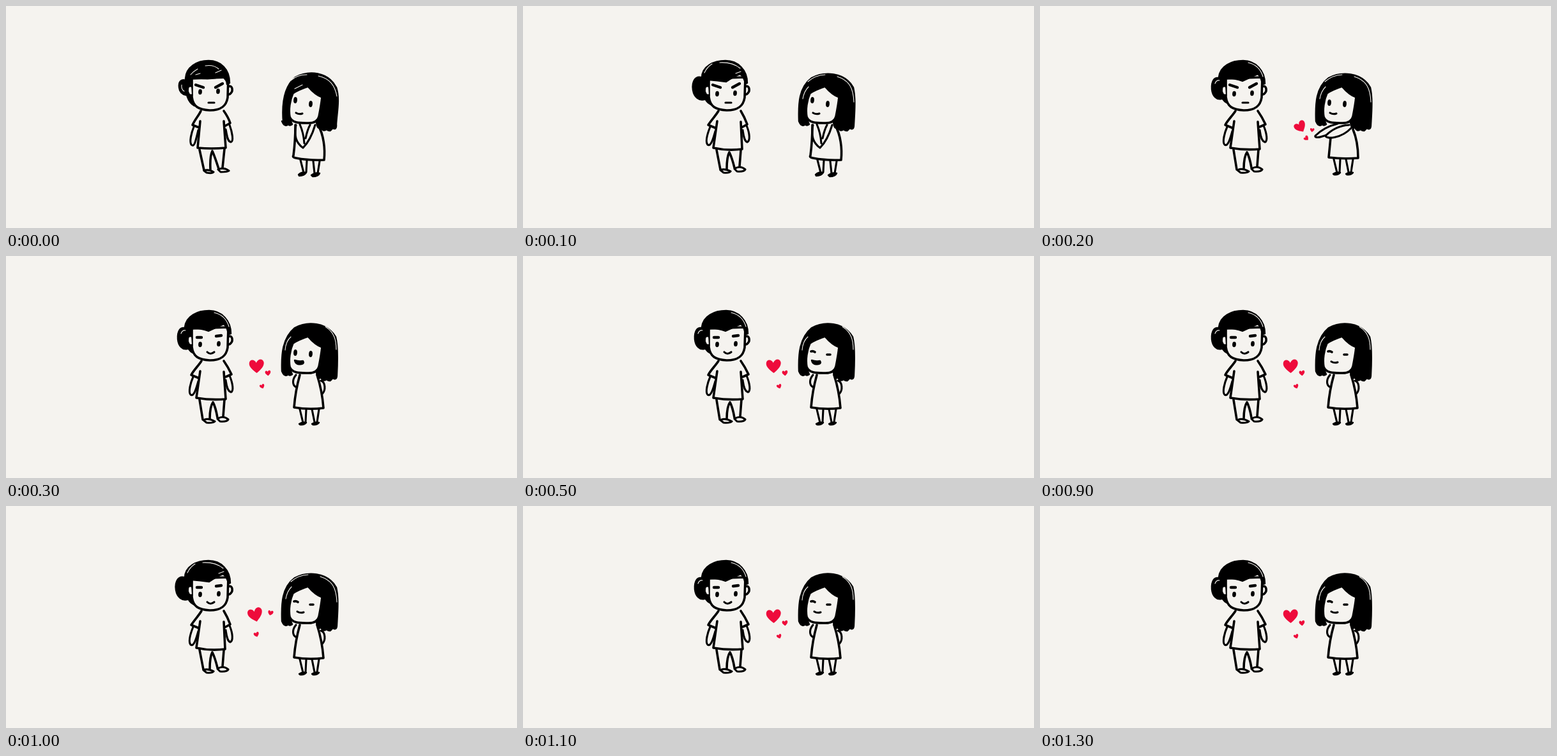
An HTML page for the animation above (1400 ms loop, 800 by 349 pixels).

```html
<!DOCTYPE html>
<html lang="en">
<head>
<meta charset="utf-8">
<title>Sending love</title>
<style>
  html, body { margin: 0; width: 100%; height: 100%; overflow: hidden; background: #f5f3ef; }
  svg { display: block; width: 100%; height: 100%; }
  path { fill: none; stroke: #000; stroke-width: 3.6; stroke-linecap: round; stroke-linejoin: round; }
  .skin { fill: #f5f3ef; }
  .ink { fill: #000; stroke-width: 2.4; }
  .brow { stroke-width: 4.4; }
  .fine { stroke-width: 3.1; }
  .shine { stroke: #f5f3ef; stroke-width: 1.1; }
  .love { fill: #ee0b3b; stroke: none; }
</style>
</head>
<body>
<svg id="stage" viewBox="0 0 800 349"></svg>
<script>
const path = (cls, d) => `<path class="${cls}" d="${d}"/>`;
const eye = (x, y, ry = 4.3) =>
  `<ellipse cx="${x}" cy="${y}" rx="2.9" ry="${ry}" transform="rotate(4 ${x} ${y})"/>`;
const heart = (x, y, size, turn) => `<g transform="translate(${x} ${y}) rotate(${turn}) scale(${size})">` +
  path('love', 'M0 11C-5 7 -12 1 -11 -5C-10 -12 -2 -11 0 -5C3 -12 11 -12 12 -5C12 2 5 7 0 11Z') + '</g>';

// Each redrawing of the man: bun, hair, shine, shirt, arms, legs, feet
const manInk = {
  A: {
    bun: 'M281 117C274 114 270 120 271 128C272 137 277 139 282 140Z',
    hair: 'M281 114C282 96 299 86 317 86C336 86 350 99 350 121L346 123C346 118 344 115 338 110C326 116 306 115 289 111L288 128C288 140 290 148 295 157C284 151 280 136 281 114Z',
    shine: 'M289 108Q293 103 300 99M297 108L304 106M312 94Q325 92 333 99M328 105L337 101M275 124Q274 131 279 134',
    shirt: 'M305 165C302 172 296 178 292 187L302 191M304 181L300 223Q322 225 344 223L341 181M341 165Q348 175 351 184L344 188',
    arms: 'M294 190C290 200 287 213 290 218C295 223 297 212 301 195M350 187C354 198 357 213 352 214C346 213 346 202 344 194',
    legs: 'M303 226L310 258M320 257Q319 236 323 228Q327 237 333 256M342 225L339 254',
    feet: 'M310 259Q316 256 325 261Q323 264 314 262ZM332 257Q341 253 349 259Q346 261 336 261Z'
  },
  B: {
    bun: 'M281 113C270 108 264 119 266 132C268 144 276 149 284 147Z',
    hair: 'M280 113C280 95 298 86 317 86C337 86 351 101 351 121L348 122C347 116 344 110 340 107Q330 111 318 119Q304 117 291 116L290 140L294 155C282 149 279 130 280 113Z',
    shine: 'M284 105Q288 96 296 91M308 89Q328 88 340 98M333 106L341 103',
    shirt: 'M306 165C302 172 295 179 290 187L302 192M304 181L298 223Q320 228 343 225L341 182M341 165Q347 175 351 186L344 190',
    arms: 'M293 190C289 200 285 213 289 218C294 222 298 208 301 197M350 188C355 200 356 212 351 214C346 212 345 202 344 195',
    legs: 'M303 226L309 257M319 257Q319 237 323 230Q327 238 331 254M341 227L339 252',
    feet: 'M309 258Q315 255 325 260Q323 263 314 262ZM331 256Q340 250 348 257Q346 261 335 260Z'
  },
  C: {
    bun: 'M282 114C273 110 268 118 269 131C270 142 277 148 284 146Z',
    hair: 'M280 112C282 94 300 86 318 86C338 86 352 102 352 122L348 123C347 116 345 110 341 107Q330 112 317 118Q304 113 291 114L290 138L292 152C282 146 279 130 280 112Z',
    shine: 'M326 89C339 92 346 101 349 111M274 122Q276 116 281 117',
    shirt: 'M306 165C301 173 294 179 290 187L302 192M304 181L298 223Q320 227 344 225L341 182M341 165Q348 175 353 186L344 190',
    arms: 'M293 190C289 199 285 214 289 218C294 222 298 208 301 197M350 188C355 200 357 213 352 214C346 212 345 202 344 195',
    legs: 'M303 226L308 257M319 257Q319 237 324 230Q328 237 331 254M342 226L340 252',
    feet: 'M309 258Q316 254 327 260Q324 263 314 262ZM331 256Q340 250 348 257Q346 261 335 260Z'
  }
};

function man(key, angry) {
  const m = manInk[key], dy = key === 'A' ? -3 : 0;
  const face = angry
    ? path('brow', 'M297 124L309 128M328 128L339 122') + eye(304, 138 + dy) + eye(332, 137 + dy) +
      path('fine', 'M317 152L326 152')
    : path('brow', 'M299 128L306 128M329 126L337 125') + eye(304, 139) + eye(333, 138) +
      path('fine', 'M315 151Q320 156 326 151');
  return path('', m.legs) + path('skin fine', m.feet) +
    path('', m.shirt) + path('fine', m.arms) +
    path('ink', m.bun) +
    path('skin', 'M348 127C354 123 356 133 352 137Q350 140 347 139') +
    path('skin', 'M291 114L291 143C293 158 301 163 319 164C337 164 345 157 347 144L348 112Z') +
    path('ink', m.hair) +
    path('skin fine', 'M290 126C284 124 283 133 286 138Q288 141 291 140') +
    path('shine', m.shine) + face;
}

const womanShine = {
  A: 'M446 117Q456 108 471 108M489 110C507 114 515 125 518 142M452 130L464 124',
  B: 'M446 119Q457 109 473 108M492 111C511 117 517 129 518 151M438 146Q440 134 447 127',
  C: 'M500 111C513 119 517 131 517 147M437 148Q438 134 446 127'
};
const hairTop = {
  A: 'M434 182C432 157 434 128 453 112C474 101 504 103 517 128C523 146 518 168 517 186',
  B: 'M432 181C431 153 432 128 452 113C471 103 503 103 517 128C521 145 519 168 518 187',
  C: 'M432 181C431 154 433 129 452 113C472 102 502 104 516 127C520 143 519 168 518 187'
};
const hairTips = 'Q518 196 511 192Q508 199 502 194Q496 198 493 191Q487 195 486 182' +
  'L492 140L460 128L445 150L443 174L448 186Q444 189 442 186Q436 191 432 181Z';

const feet = () =>
  path('fine', 'M460 241L465 262M470 241L469 261M479 241L483 261M490 241L487 261') +
  path('ink', 'M459 264Q464 260 470 262Q467 266 460 265ZM479 264Q484 260 490 262Q487 266 480 265Z');

// Dress, arms and legs for each gesture
const gestures = {
  clasp: () =>
    path('', 'M453 187Q453 212 450 235Q448 238 454 239Q474 243 498 242C500 224 497 202 489 188') +
    path('fine', 'M454 187C450 205 455 216 465 223C472 216 479 204 484 187M460 186Q466 200 467 216M476 187Q472 194 469 208') +
    path('fine', 'M461 242L466 262M471 243L470 261M481 244L483 263M491 244L488 263') +
    path('ink', 'M458 265Q463 260 470 262Q467 267 459 267ZM478 266Q484 261 491 263Q489 268 480 268Z'),
  send: () =>
    path('', 'M455 207L452 238Q474 241 498 239C498 222 495 206 490 194') +
    path('skin fine', 'M466 185C450 189 438 197 431 204C429 209 444 206 454 200') +
    path('skin fine', 'M484 187C468 188 455 196 447 204C448 210 472 208 487 192') + feet(),
  hide: () =>
    path('', 'M460 187Q453 212 451 238Q474 242 497 239Q495 212 487 187') +
    path('fine', 'M454 187C448 194 448 203 454 206M493 196C500 198 501 211 495 217') + feet()
};

function woman(key, gesture, shut, laugh) {
  const up = gesture === 'clasp' ? -4 : 0;
  const eyes = shut
    ? path('', 'M451 150Q454 149 457 151M476 155L481 155')
    : eye(453, 152 + up, 5) + eye(477, 154, 5);
  const mouth = laugh
    ? path('ink', 'M452 164Q458 166 465 165C468 170 462 171 457 170Q453 169 452 164Z')
    : path('fine', gesture === 'hide' ? 'M456 166Q461 169 466 167' : 'M454 168Q459 171 464 169');
  return gestures[gesture]() +
    path('ink', hairTop[key] + hairTips) +
    path('skin', 'M473 126C464 129 456 132 449 137C444 148 442 163 444 174C448 185 461 184 474 184C483 184 488 181 490 174C492 164 494 153 495 143C486 140 479 133 473 126Z') +
    path('shine', womanShine[key]) + eyes + mouth;
}

const hearts = {
  thrown: heart(407.5, 190, .8, -32) + heart(426, 195, .29, 5) + heart(417, 208, .34, -50),
  B: heart(390, 171, 1, -14) + heart(414, 168, .36, 12) + heart(392, 202, .36, -18),
  C: heart(392, 173, 1, -3) + heart(410, 184, .38, -8) + heart(401, 205, .33, -22)
};

function scene(i) {
  const key = i % 2 ? 'C' : 'B';
  if (i < 2) return man(i ? 'B' : 'A', true) + woman(i ? 'B' : 'A', 'clasp');
  if (i === 2) return man('C', true) + woman('B', 'send') + hearts.thrown;
  return man(key, false) + woman(key, 'hide', i > 4, i < 9) + hearts[key];
}

const stage = document.getElementById('stage');
const scenes = Array.from({ length: 14 }, (_, i) => scene(i));
let shown = -1;
function draw() {
  const i = Math.floor(performance.now() % 1400 / 100);
  if (i !== shown) stage.innerHTML = scenes[shown = i];
  requestAnimationFrame(draw);
}
draw();
</script>
</body>
</html>
```
